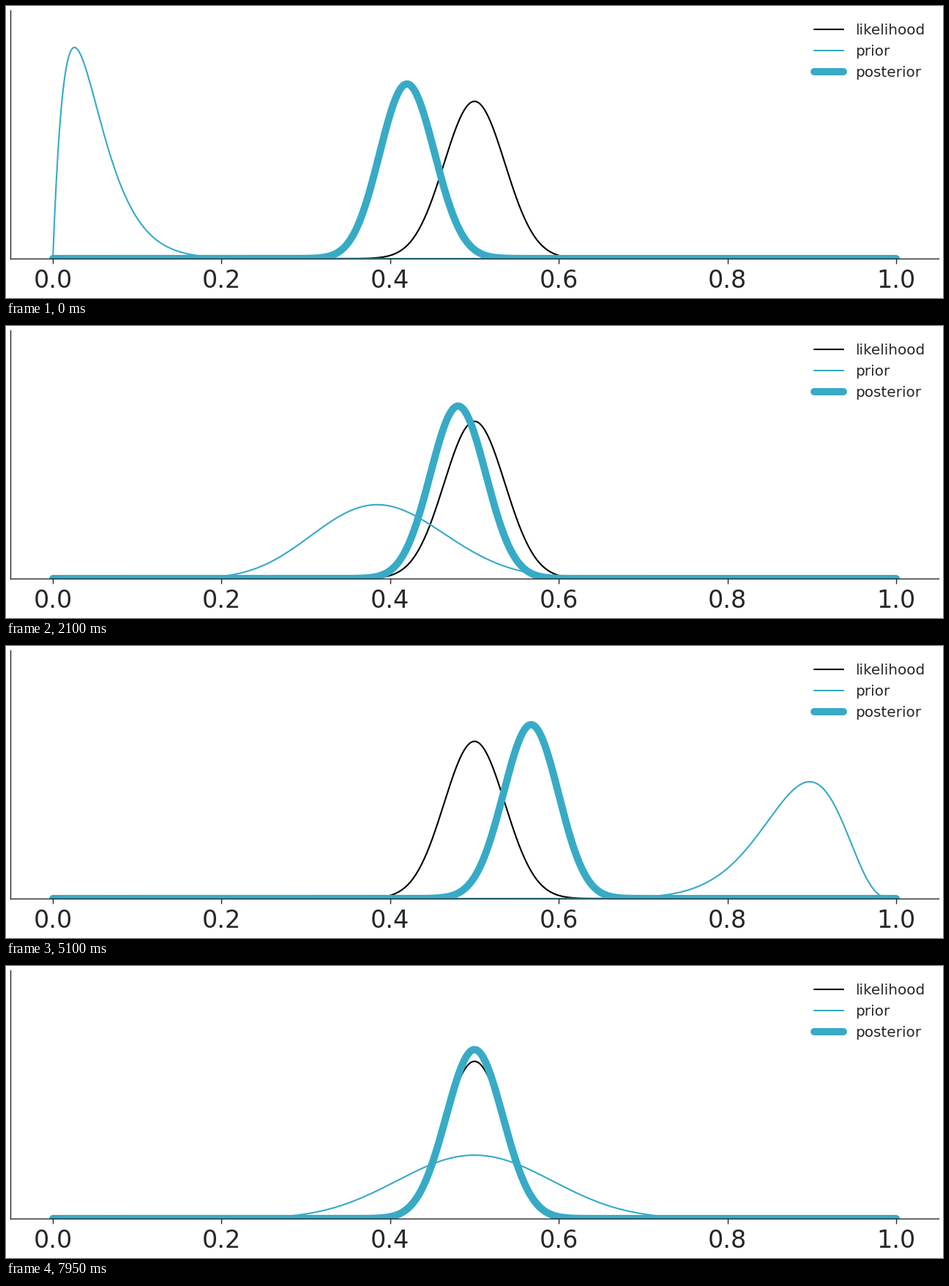
These frames come from a looping animation (1280 by 400 pixels, 8 s). A matplotlib script:

```python
import math

import numpy as np
import matplotlib.pyplot as plt
from matplotlib.animation import FuncAnimation

W, H, DPI = 1280, 400, 80
INK, TEAL = "#262626", "#37abc6"
HEADS = TAILS = 96
TICK = 50            # ms per drawn frame
HOLD = 3             # drawn frames per step
SWEEP = 38           # steps in which the prior slides from left to right
LOOP = 8000

plt.rcParams.update({
    "font.family": "DejaVu Sans",
    "lines.solid_capstyle": "round",
    "text.color": INK,
})

x = np.linspace(0, 1, 1000)


def beta_pdf(a, b):
    norm = math.exp(math.lgamma(a + b) - math.lgamma(a) - math.lgamma(b))
    return norm * x ** (a - 1) * (1 - x) ** (b - 1)


def prior_shape(step):
    """Slide a fixed-strength prior across, then sharpen a centred one."""
    if step < SWEEP:
        return step + 2, 39 - step
    k = step - SWEEP + 1
    return k, k


fig = plt.figure(figsize=(W / DPI, H / DPI), dpi=DPI, facecolor="white")
left, right, top, bottom = 6.4, 1273.6, 6.4, 346
ax = fig.add_axes([left / W, 1 - bottom / H, (right - left) / W, (bottom - top) / H])
ax.set_xlim(-0.05, 1.05)
ax.set_ylim(0, 17.5)
ax.set_yticks([])
ax.set_xticks(np.linspace(0, 1, 6))
ax.tick_params(axis="x", length=6, width=1.25, pad=7, color=INK,
               labelcolor=INK, labelsize=30)
for side, spine in ax.spines.items():
    spine.set(color=INK, linewidth=1.25, visible=side in ("left", "bottom"))

ax.plot(x, beta_pdf(HEADS + 1, TAILS + 1), color="black", lw=1.9, label="likelihood")
prior, = ax.plot([], [], color=TEAL, lw=1.9, label="prior")
posterior, = ax.plot([], [], color=TEAL, lw=9, label="posterior")
ax.legend(loc="upper right", fontsize=18, frameon=False)


def draw(frame):
    a, b = prior_shape(frame // HOLD)
    prior.set_data(x, beta_pdf(a, b))
    posterior.set_data(x, beta_pdf(a + HEADS, b + TAILS))
    return prior, posterior


anim = FuncAnimation(fig, draw, frames=LOOP // TICK, interval=TICK,
                     repeat=True, repeat_delay=0)
plt.show()
```
